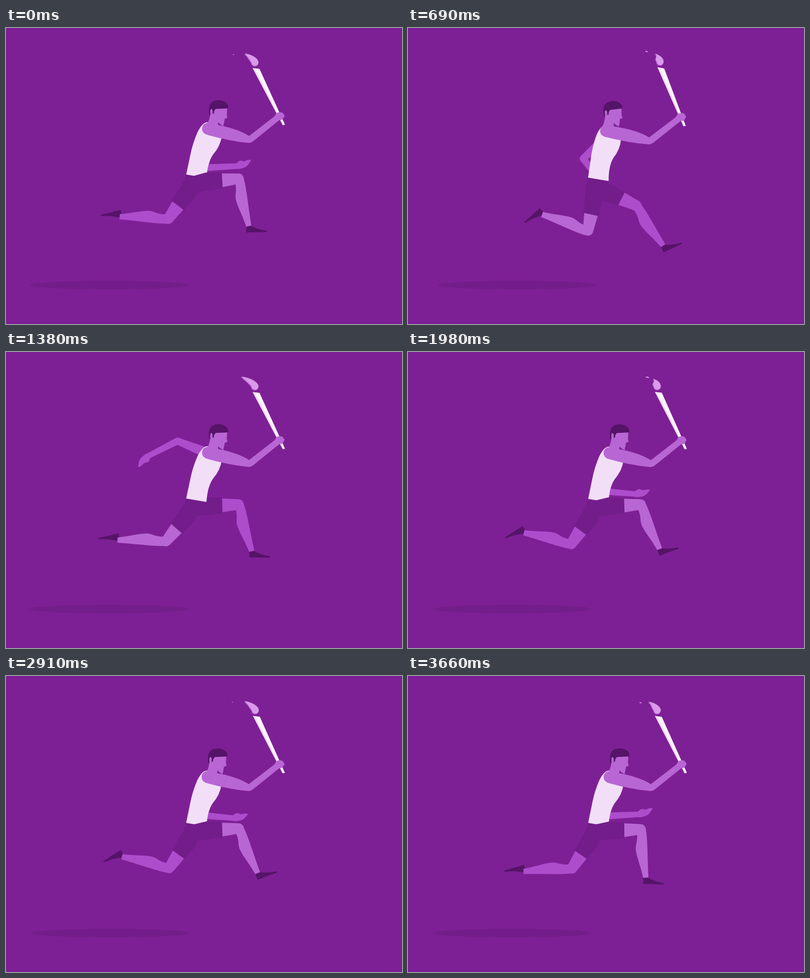
Write an HTML page with a canvas that moves like this. It is 800 px wide and 600 px high and loops after 3690 ms.

```html
<!DOCTYPE html>
<html lang="en">
<head>
<meta charset="utf-8">
<title>Torch runner</title>
<style>
html, body { margin: 0; width: 100%; height: 100%; overflow: hidden; background: #7e2095; }
canvas { display: block; width: 800px; height: 600px; }
</style>
</head>
<body>
<canvas id="stage" width="800" height="600"></canvas>
<script>
const ctx = document.getElementById('stage').getContext('2d');
const LOOP = 3690, STRIDE = 930, STEP = 30, FLICKER = LOOP / 14;
const THIGH = 89, SHIN = 97, UPPER = 76, FORE = 68;
const C = {
  bg: '#7e2095', shade: '#731d8a', dark: '#551468', far: '#ae4dcc',
  near: '#b866d4', cloth: '#f2dff7', shine: '#fcf5fd', flame: '#da9aea', ember: '#b866d4'
};

// Limbs hang down along +y from their joint, with +x as the front side.
const SHAPE = {
  thigh: new Path2D('M15 45L12 89A10 10 0 0 1 -9 89L-15 45Z'),
  knee: new Path2D('M10 0A10 10 0 1 1 -10 0A10 10 0 1 1 10 0Z'),
  shin: new Path2D('M10.5 -1C12 20 9 40 5.5 97L-5 97C-8 70 -13 58 -14 38C-13 25 -7 22 -8 0Z'),
  shorts: new Path2D('M13 0L18 24L16 56L-16 56L-21 0Z'),
  shoe: new Path2D('M-5 -2L6 0Q20 6 37 7L38 10Q20 11 -4 13Z'),
  upper: new Path2D('M11 0L7 76A7 7 0 0 1 -7 76L-11 0Z'),
  fore: new Path2D('M7 0L5.5 70L-5.5 70L-7 0A7 7 0 0 1 7 0Z'),
  hand: new Path2D('M-5.5 -3Q-9 12 -4 20L3 29Q7 22 5 15L9 8Q9 2 5.5 -3Z')
};
// Body parts stand at their places on the stage.
const BODY = {
  face: new Path2D('M413 162L447 162L446 176L447.5 182L442 184L441 190L439 199Q433 196 429 191L428 200L405 197Q412 186 413 172Z'),
  hair: new Path2D('M412 178Q409 174 410 165Q410 154 418 149Q430 143 443 150Q450 155 449 163L424 164Q420 167 420 173L417 174L413 172Z'),
  tank: new Path2D('M407 191Q397 191 387 211Q377 234 372.5 257L364 297L405 304Q407 273 418 257Q433 240 436 219Z'),
  pelvis: new Path2D('M364 296L406 302L399 328L376 333L358 320Z'),
  arm: new Path2D('M408 192Q397 193 396 204Q396 214 408 217Q450 229 490 233Q495 233 500 229L553 186L545 177L491 219Q470 205 430 197Z'),
  fist: new Path2D('M543 178L547 172Q553 169 559 172L563 178L559 185Q552 189 545 185Z'),
  torch: new Path2D('M498 81L512 83L563.5 196L559 197Z'),
  glint: new Path2D('M503 82L512 83L563.5 196L561 196.5Z')
};

// Each leg differs a little in its swing: thigh centre, thigh range, extra kick of the shin.
const NEAR = { lag: 0, mid: 26, range: 68, kick: 2, skin: C.near };
const FAR = { lag: STRIDE / 2, mid: 27, range: 65, kick: 7, skin: C.far };

const rad = d => d * Math.PI / 180;
const turn = (t, peak) => 2 * Math.PI * (t - peak) / STRIDE;
// Swing between -1 and 1 that lingers at both ends; k sets how long.
const swing = (angle, k) => Math.tanh(k * Math.cos(angle)) / Math.tanh(k);
const reach = ([x, y], deg, len) => [x + len * Math.sin(rad(deg)), y + len * Math.cos(rad(deg))];

function fill(path, color) {
  ctx.fillStyle = color;
  ctx.fill(path);
}

function within(matrix, paint) {
  ctx.save();
  ctx.transform(...matrix);
  paint();
  ctx.restore();
}

// Turn by an angle around a point, then move.
function pivot(x, y, angle, dx, dy) {
  const c = Math.cos(angle), s = Math.sin(angle);
  return [c, s, -s, c, x + dx - c * x + s * y, y + dy - s * x - c * y];
}

function put(shape, [x, y], deg, color) {
  const c = Math.cos(rad(deg)), s = Math.sin(rad(deg));
  within([c, s, -s, c, x, y], () => fill(shape, color));
}

function oval(x, y, rx, ry, color, angle = 0) {
  const path = new Path2D();
  path.ellipse(x, y, rx, ry, angle, 0, Math.PI * 2);
  fill(path, color);
}

function leg({ lag, mid, range, kick, skin }, t, drop) {
  const stride = swing(turn(t + lag, 38), 2);
  const phase = turn(t + lag, 85), flex = swing(phase, 3.5);
  const a = mid + range * stride;
  const b = -41 + 59 * flex + 14 * Math.sin(phase) + kick * Math.max(0, flex);
  const foot = 74 - 84 * flex - 14 * Math.sin(2 * phase);
  const hip = [381, 314 - 1.5 * stride + drop];
  const knee = reach(hip, a, THIGH), ankle = reach(knee, b, SHIN);
  put(SHAPE.shoe, ankle, foot, C.dark);
  put(SHAPE.thigh, hip, -a, skin);
  put(SHAPE.knee, knee, 0, skin);
  put(SHAPE.shin, knee, -b, skin);
  put(SHAPE.shorts, hip, -a, C.shade);
}

function farArm(shoulder, t) {
  const s = swing(turn(t, -25), 2.5);
  const a = -62 + 50 * s, b = 15 + 78 * s;
  const elbow = reach(shoulder, a, UPPER);
  put(SHAPE.upper, shoulder, -a, C.far);
  put(SHAPE.fore, elbow, -b, C.far);
  put(SHAPE.hand, reach(elbow, b, FORE), -b - 16, C.far);
}

// The tongue grows, tears off and drifts away as shrinking wisps.
function flame(t) {
  const age = (t / FLICKER + .58) % 1;
  const len = 3 + 25 * age ** 1.2;
  const x = 497 - len, y = 57 - len * .25;
  const path = new Path2D(`M509 71C509 63 ${x + len * .6 + 5} ${y + 2} ${x} ${y}` +
    `C${x + 8} ${y + 7} 489 63 495 71Q496 78 503 78Q509 77 509 71Z`);
  fill(path, C.ember);
  within([1, 0, 0, 1, 1, -1.5], () => fill(path, C.flame));
  for (let i = 0; i < 2; i++) {
    const drift = age - .2 * i, size = 4.5 * (1 - drift / .6);
    if (drift > 0 && size > .4) {
      oval(490 - 80 * drift, 52 + 4 * i - 5 * drift, size, Math.min(1.2, size / 3), C.flame, .2);
    }
  }
}

function draw(t) {
  const p = t % STRIDE;
  // How far the body has sunk and straightened towards a landing, twice per stride.
  const w = ((1 + Math.cos(2 * turn(p, 262))) / 2) ** 2;

  ctx.fillStyle = C.bg;
  ctx.fillRect(0, 0, 800, 600);
  oval(208.5 + 14 * w, 521, 160.5, 9, C.shade);

  farArm([417 - 8 * w, 209 + 5 * w], p);
  leg(FAR, p, 9.5 * w);
  within([1, 0, 0, 1, -w, 8.5 * w], () => fill(BODY.pelvis, C.shade));
  within(pivot(428, 170, -.09 * w, -17 * w, 2 * w), () => {
    fill(BODY.face, C.near);
    fill(BODY.hair, C.dark);
    oval(415, 170, 2.5, 6, C.near);
  });
  within([1, 0, .08 * w, 1, -24 * w, 7 * w], () => fill(BODY.tank, C.cloth));
  leg(NEAR, p, 9.5 * w);

  within(pivot(552, 179, .08 * w, -1.5 * w, 2 * w), () => {
    fill(BODY.torch, C.cloth);
    fill(BODY.glint, C.shine);
    flame(t);
  });
  within([1 + .048 * w, -.019 * w, 0, 1, -28 * w, 12.5 * w], () => {
    fill(BODY.arm, C.near);
    fill(BODY.fist, C.near);
  });
}

const start = performance.now();
function tick() {
  const ms = (performance.now() - start) % LOOP;
  draw(Math.floor(ms / STEP) * STEP);
  requestAnimationFrame(tick);
}
tick();
</script>
</body>
</html>
```
